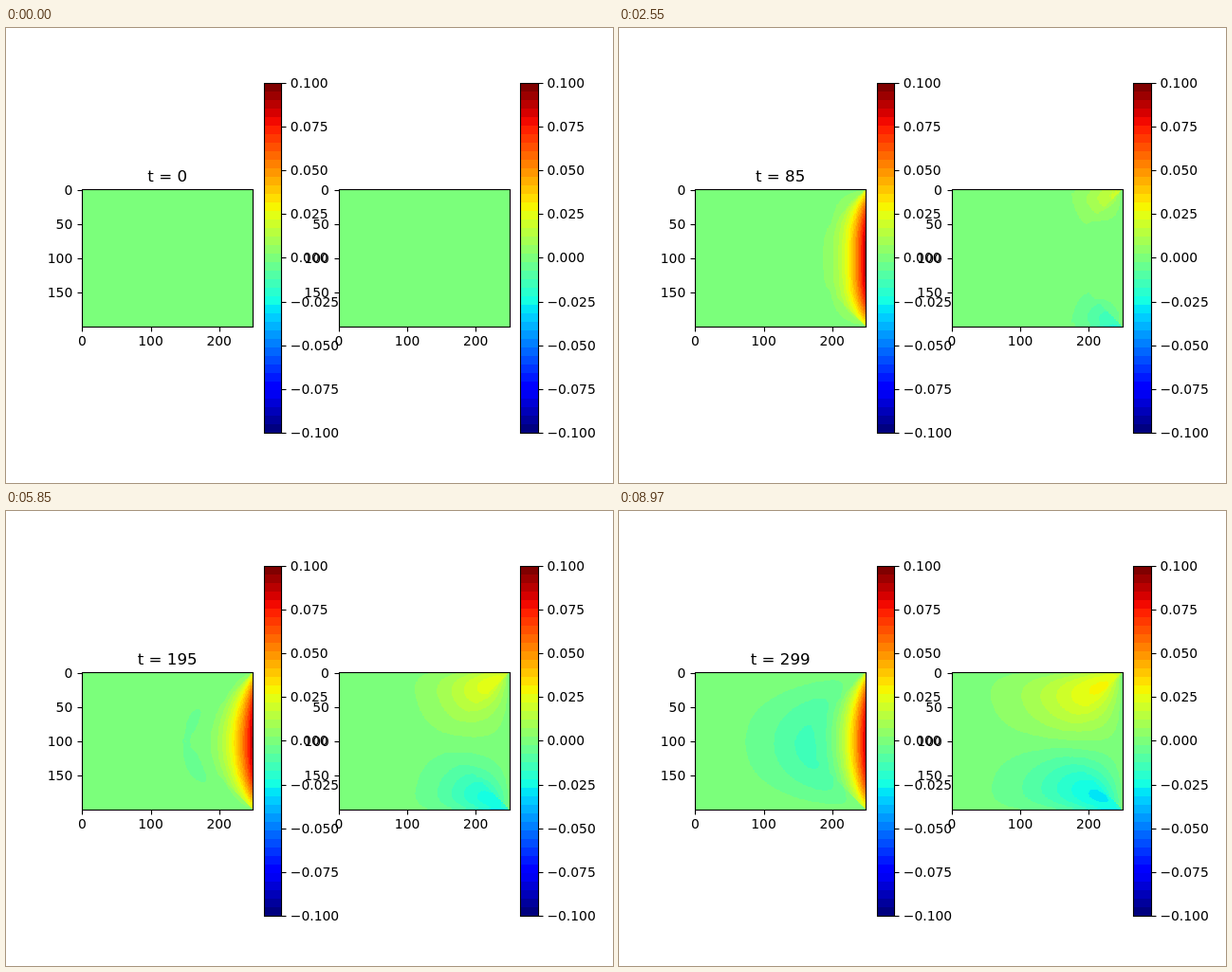
Write an HTML page with a canvas that moves like this. It is 640 px wide and 480 px high and loops after 9000 ms.

```html
<!DOCTYPE html>
<html lang="en">
<head>
<meta charset="utf-8">
<title>Sliding lid flow</title>
<style>
html, body { margin: 0; width: 100%; height: 100%; overflow: hidden; background: #fff; }
canvas { display: block; }
</style>
</head>
<body>
<canvas id="stage" width="640" height="480"></canvas>
<script>
const ctx = document.getElementById('stage').getContext('2d');
const STEP_MS = 30, STEPS = 300;

// ---- Colours: a jet scale cut into flat bands ----
const BANDS = 41, VMAX = 0.1;

function ramp(points, x) {
  let k = 1;
  while (k < points.length - 1 && x > points[k][0]) k++;
  const [x0, y0] = points[k - 1], [x1, y1] = points[k];
  return Math.round(255 * (y0 + (y1 - y0) * (x - x0) / (x1 - x0)));
}

const RED = [[0, 0], [0.35, 0], [0.66, 1], [0.89, 1], [1, 0.5]];
const GREEN = [[0, 0], [0.125, 0], [0.375, 1], [0.64, 1], [0.91, 0], [1, 0]];
const BLUE = [[0, 0.5], [0.11, 1], [0.34, 1], [0.65, 0], [1, 0]];
const palette = Array.from({ length: BANDS }, (_, i) =>
  [RED, GREEN, BLUE].map(c => ramp(c, i / (BANDS - 1))));

function band(v) {
  const i = Math.floor((v / VMAX + 1) / 2 * BANDS);
  return i < 0 ? 0 : i >= BANDS ? BANDS - 1 : i;
}

// ---- Flow: D2Q9 lattice Boltzmann box, right wall sliding down ----
const W = 250, H = 200, ROW = W + 2, SIZE = ROW * (H + 2);
const OMEGA = 0.07, LID = 0.1;
const CX = [0, 1, 0, -1, 0, 1, -1, -1, 1];
const CY = [0, 0, 1, 0, -1, 1, 1, -1, -1];
const OPP = [0, 3, 4, 1, 2, 7, 8, 5, 6];
const WT = CX.map((c, i) => i === 0 ? 4 / 9 : i < 5 ? 1 / 9 : 1 / 36);
const fresh = () => WT.map(w => new Float32Array(SIZE).fill(w));
let cur = fresh(), next = fresh();
const rho = new Float32Array(SIZE).fill(1);
const ux = new Float32Array(SIZE), uy = new Float32Array(SIZE);

// Fill the ghost cells so that streaming bounces back off the walls.
function bounce(x, y) {
  const p = y * ROW + x;
  for (let i = 1; i < 9; i++) {
    const sx = x - CX[i], sy = y - CY[i];
    if (sx > 0 && sx <= W && sy > 0 && sy <= H) continue;
    const push = sx > W ? 6 * WT[i] * rho[p] * CY[i] * LID : 0;
    cur[i][sy * ROW + sx] = cur[OPP[i]][p] + push;
  }
}

function walls() {
  for (let x = 1; x <= W; x++) { bounce(x, 1); bounce(x, H); }
  for (let y = 2; y < H; y++) { bounce(1, y); bounce(W, y); }
}

function advance() {
  walls();
  const [a0, a1, a2, a3, a4, a5, a6, a7, a8] = cur;
  const [b0, b1, b2, b3, b4, b5, b6, b7, b8] = next;
  const keep = 1 - OMEGA;
  for (let y = 1; y <= H; y++) {
    for (let p = y * ROW + 1, end = p + W; p < end; p++) {
      const f0 = a0[p], f1 = a1[p - 1], f2 = a2[p - ROW];
      const f3 = a3[p + 1], f4 = a4[p + ROW], f5 = a5[p - ROW - 1];
      const f6 = a6[p - ROW + 1], f7 = a7[p + ROW + 1], f8 = a8[p + ROW - 1];
      const r = f0 + f1 + f2 + f3 + f4 + f5 + f6 + f7 + f8;
      const u = (f1 + f5 + f8 - f3 - f6 - f7) / r;
      const v = (f2 + f5 + f6 - f4 - f7 - f8) / r;
      rho[p] = r; ux[p] = u; uy[p] = v;
      const base = 1 - 1.5 * (u * u + v * v);
      const s = u + v, d = u - v;
      const wa = OMEGA * r / 9, wd = OMEGA * r / 36;
      const qu = base + 4.5 * u * u, qv = base + 4.5 * v * v;
      const qs = base + 4.5 * s * s, qd = base + 4.5 * d * d;
      b0[p] = keep * f0 + 4 * wa * base;
      b1[p] = keep * f1 + wa * (qu + 3 * u);
      b3[p] = keep * f3 + wa * (qu - 3 * u);
      b2[p] = keep * f2 + wa * (qv + 3 * v);
      b4[p] = keep * f4 + wa * (qv - 3 * v);
      b5[p] = keep * f5 + wd * (qs + 3 * s);
      b7[p] = keep * f7 + wd * (qs - 3 * s);
      b8[p] = keep * f8 + wd * (qd + 3 * d);
      b6[p] = keep * f6 + wd * (qd - 3 * d);
    }
  }
  [cur, next] = [next, cur];
}

// ---- Panels ----
const AX_W = 496 / 2.2 * 0.8, AX_H = AX_W * H / W;
const TOP = 242.4 - AX_H / 2;
const BAR_TOP = 57.6, BAR_H = 369.6, BAR_W = BAR_H / 20;
const snap = v => Math.floor(v + 0.5) + 0.5;

function makePanel(left, field) {
  const x = Math.round(left), y = Math.round(TOP);
  const w = Math.round(left + AX_W) - x + 1, h = Math.round(TOP + AX_H) - y + 1;
  const clamp = (v, n) => Math.min(n - 1, Math.max(0, Math.floor(v)));
  const cols = Array.from({ length: w }, (_, i) => 1 + clamp((x + i + 0.5 - left) / AX_W * W, W));
  const rows = Array.from({ length: h }, (_, j) => 1 + clamp((y + j + 0.5 - TOP) / AX_H * H, H));
  return { left, bar: left + AX_W / 0.8 * 0.85, field, x, y, w, h, cols, rows,
    shots: [], image: ctx.createImageData(w, h) };
}

const panels = [makePanel(80, uy), makePanel(80 + AX_W * 1.5, ux)];

function record(p) {
  const shot = new Uint8Array(p.w * p.h);
  let k = 0;
  for (const r of p.rows) for (const c of p.cols) shot[k++] = band(p.field[r * ROW + c]);
  p.shots.push(shot);
}

// Run the flow only as far as the asked step; later loops reuse the results.
function prepare(n) {
  while (panels[0].shots.length <= n) {
    if (panels[0].shots.length) advance();
    panels.forEach(record);
  }
}

// ---- Drawing ----
function line(x0, y0, x1, y1) {
  ctx.beginPath();
  ctx.moveTo(x0, y0);
  ctx.lineTo(x1, y1);
  ctx.stroke();
}

function frame(x, y, w, h) {
  const l = snap(x), t = snap(y);
  ctx.strokeRect(l, t, snap(x + w) - l, snap(y + h) - t);
}

function label(text, x, y, align, size = 10) {
  ctx.font = size * 100 / 72 + 'px "DejaVu Sans", sans-serif';
  ctx.textAlign = align;
  ctx.fillText(text, x, Math.round(y));
}

function drawField(p, n) {
  const shot = p.shots[n], px = p.image.data;
  for (let k = 0, o = 0; k < shot.length; k++, o += 4) {
    const c = palette[shot[k]];
    px[o] = c[0]; px[o + 1] = c[1]; px[o + 2] = c[2]; px[o + 3] = 255;
  }
  ctx.putImageData(p.image, p.x, p.y);
}

function drawAxes(p) {
  const bottom = TOP + AX_H;
  for (let v = 0; v < W; v += 100) {
    const x = p.left + (v + 0.5) / W * AX_W, s = snap(x);
    line(s, snap(bottom), s, snap(bottom) + 5);
    label(v, x, 335, 'center');
  }
  for (let v = 0; v < H; v += 50) {
    const y = TOP + (v + 0.5) / H * AX_H, s = snap(y);
    line(snap(p.left), s, snap(p.left) - 5, s);
    label(v, p.left - 9.72, y + 5, 'right');
  }
  frame(p.left, TOP, AX_W, AX_H);
}

function drawBar(p) {
  const x = Math.round(p.bar), w = Math.round(p.bar + BAR_W) - x;
  const edge = i => Math.round(BAR_TOP + BAR_H * (1 - i / BANDS));
  palette.forEach((c, i) => {
    ctx.fillStyle = `rgb(${c})`;
    ctx.fillRect(x, edge(i + 1), w, edge(i) - edge(i + 1));
  });
  ctx.fillStyle = '#000';
  const right = snap(p.bar + BAR_W);
  for (let k = -4; k <= 4; k++) {
    const y = BAR_TOP + BAR_H * (4 - k) / 8;
    line(right, snap(y), right + 5, snap(y));
    const text = Math.abs(k * 0.025).toFixed(3);
    label(k < 0 ? '\u2212' + text : text, p.bar + BAR_W + 9.72, y + 5, 'left');
  }
  frame(p.bar, BAR_TOP, BAR_W, BAR_H);
}

function draw(n) {
  prepare(n);
  ctx.fillStyle = '#fff';
  ctx.fillRect(0, 0, 640, 480);
  ctx.fillStyle = ctx.strokeStyle = '#000';
  ctx.lineWidth = 1.11;
  for (const p of panels) {
    drawField(p, n);
    drawAxes(p);
    drawBar(p);
  }
  label('t = ' + n, 80 + AX_W / 2, 162, 'center', 12);
}

let shown = -1;
function tick() {
  const n = Math.floor(performance.now() / STEP_MS) % STEPS;
  if (n !== shown) draw(shown = n);
  requestAnimationFrame(tick);
}
tick();
</script>
</body>
</html>
```
